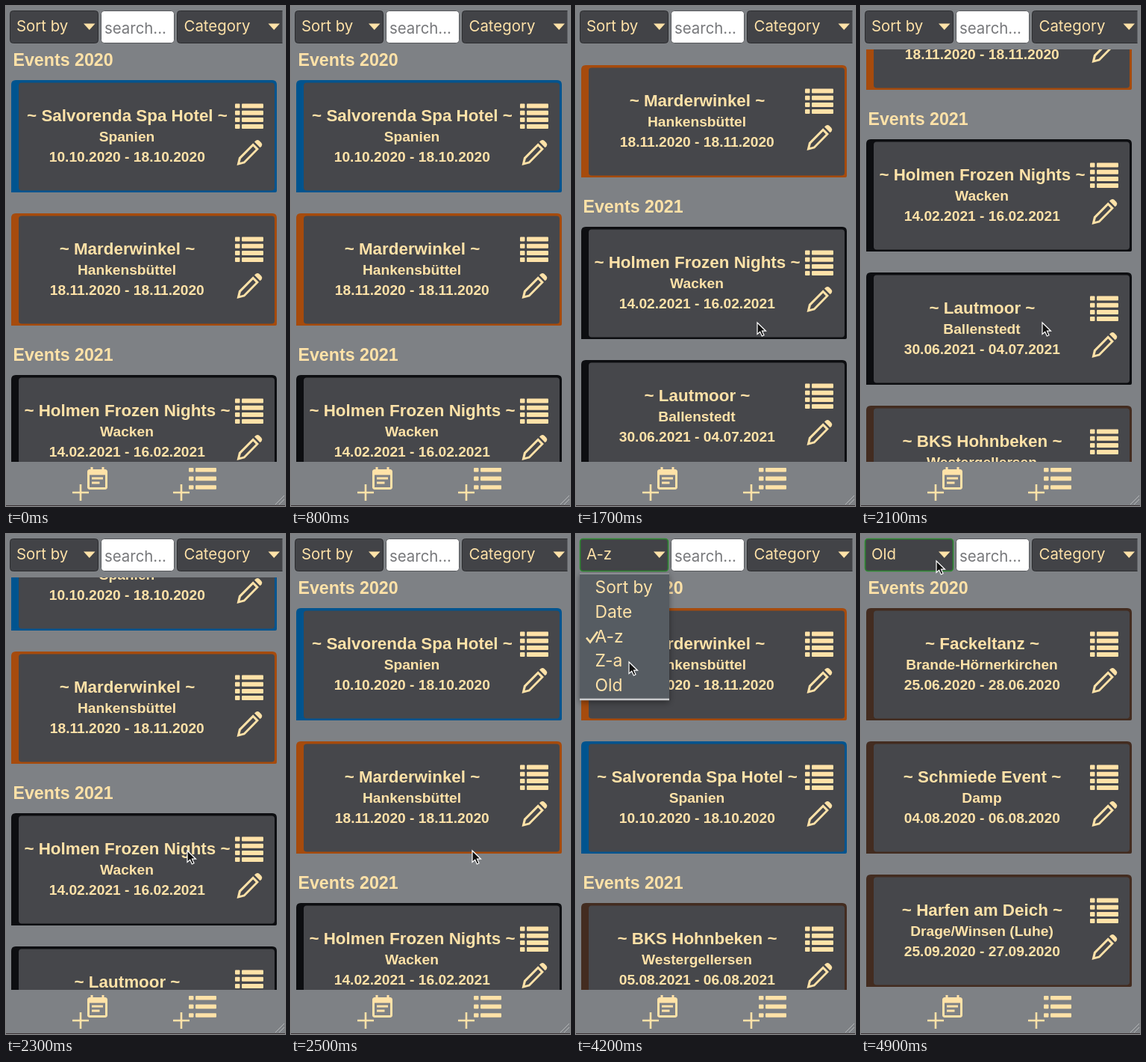
These frames come from a looping animation (374 by 668 pixels, 5 s). An HTML page:

```html
<!DOCTYPE html>
<html lang="de">
<head>
<meta charset="utf-8">
<title>Events</title>
<style>
html, body { margin: 0; width: 100%; height: 100%; overflow: hidden; background: #7e8185; }
svg { display: block; }
text { fill: #ffe2a8; font: bold 19.2px "Liberation Sans", Arial, sans-serif; }
.year { font-size: 23.2px; }
.name { font-size: 22.4px; }
.mid { text-anchor: middle; }
.ui { font: 20.4px Inter, sans-serif; }
.item { font: 22.8px Inter, sans-serif; }
.icon { fill: #ffe2a8; }
.line { fill: none; stroke: #ffe2a8; stroke-width: 2.6; }
.box { fill: #424347; stroke: #2c2d30; }
.box.focus { stroke: #2c8a30; stroke-width: 1.6; }
</style>
</head>
<body>
<svg width="374" height="668" viewBox="0 0 374 668">
  <defs>
    <g id="list" class="icon"></g>
    <g id="pencil">
      <path class="icon" fill-rule="evenodd" d="M.5 34 3 23.5 22.2 4.3 30 12.100 11 31.300ZM4.600 29.900 9.500 28.700 25.800 12.200 22.200 8.600 5.900 25Z"/>
      <path class="icon" d="M24 2.600 26 .8q2.300-1.700 4.600 .3l2.700 2.700q2 2.200 .3 4.500l-1.900 2Z"/>
    </g>
    <filter id="shade" x="-20%" y="-20%" width="140%" height="140%">
      <feDropShadow dx="0" dy="3" stdDeviation="4" flood-opacity=".4"/>
    </filter>
  </defs>
  <rect width="374" height="668" fill="#7e8185"/>
  <g id="events"></g>

  <rect width="374" height="58" fill="#7e8185"/>
  <rect id="sort" class="box" x="5.500" y="6.500" width="118" height="43" rx="4"/>
  <text id="choice" class="ui" x="14" y="34"></text>
  <path class="icon" d="M104 23.500h15.500l-7.750 8.500Z"/>
  <rect x="127.500" y="6.500" width="98" height="43" rx="4" fill="#fff" stroke="#55575b"/>
  <text class="ui" x="132" y="37" style="fill:#77787b">search...</text>
  <path class="box" d="M370.500 6.500H233.500q-4 0-4 4V45.500q0 4 4 4H370.500"/>
  <text class="ui" x="238.500" y="34">Category</text>
  <path class="icon" d="M351.500 23.500h15.500l-7.750 8.500Z"/>

  <rect y="609" width="374" height="59" fill="#7e8185"/>
  <path class="icon" transform="translate(104.5 614.5) scale(1.5)" d="M17 10H7v2h10zM19 3h-1V1h-2v2H8V1H6v2H5c-1.100 0-2 .9-2 2v14c0 1.100 .9 2 2 2h14c1.100 0 2-.9 2-2V5c0-1.100-.9-2-2-2zM19 19H5V8h14zM14 14H7v2h7z" fill-rule="evenodd"/>
  <path class="line" d="M89 650h22m-11-11v22M224 650h22m-11-11v22"/>
  <g id="rows" class="icon"></g>
  <path d="M361 666l12-12m-7 12l7-7" stroke="#b5b7b9" fill="none"/>
  <rect y="667" width="374" height="1" fill="#3b3335"/>

  <g id="menu"></g>
  <path id="cursor" d="M0 0V15.500L3.700 12.200 6.300 18 9 16.800 6.500 11.200H11.500Z" fill="#111" stroke="#fff" stroke-width="1.200"/>
</svg>
<script>
const $ = id => document.getElementById(id);
const blue = '#00548f', orange = '#a64b0d', black = '#0d0e11', brown = '#432c20';

const hotel = ['Salvorenda Spa Hotel', 'Spanien', '10.10.2020 - 18.10.2020', blue];
const park = ['Marderwinkel', 'Hankensbüttel', '18.11.2020 - 18.11.2020', orange];
const nights = ['Holmen Frozen Nights', 'Wacken', '14.02.2021 - 16.02.2021', black];
const rock = ['Lautmoor', 'Ballenstedt', '30.06.2021 - 04.07.2021', black];
const fair = ['BKS Hohnbeken', 'Westergellersen', '05.08.2021 - 06.08.2021', brown];
const dance = ['Fackeltanz', 'Brande-Hörnerkirchen', '25.06.2020 - 28.06.2020', brown];
const smiths = ['Schmiede Event', 'Damp', '04.08.2020 - 06.08.2020', brown];
const harps = ['Harfen am Deich', 'Drage/Winsen (Luhe)', '25.09.2020 - 27.09.2020', brown];

const lists = {
  'Sort by': { 2020: [hotel, park], 2021: [nights, rock, fair] },
  'A-z': { 2020: [park, hotel], 2021: [fair, nights, rock] },
  'Old': { 2020: [dance, smiths, harps] }
};
const options = ['Sort by', 'Date', 'A-z', 'Z-a', 'Old'];

// [time, value...]
const scrollKeys = [[1200, 0], [1300, 25], [1700, 198], [2000, 306], [2100, 315],
  [2200, 255], [2300, 120], [2400, 30], [2500, 0]];
const cursorKeys = [[900, 374, 470], [1200, 243, 423], [2500, 243, 423], [3000, 108, 32],
  [3200, 106, 34], [3500, 66, 137], [3700, 68, 139], [4000, 102, 34], [4100, 94, 70],
  [4200, 71, 171], [4400, 60, 200], [4600, 62, 202], [4800, 96, 60], [4900, 101, 36]];

function at(keys, t) {
  if (t <= keys[0][0]) return keys[0].slice(1);
  const i = keys.findIndex(k => k[0] >= t);
  if (i < 0) return keys[keys.length - 1].slice(1);
  const a = keys[i - 1], b = keys[i], p = (t - a[0]) / (b[0] - a[0]);
  return a.slice(1).map((v, j) => v + (b[j + 1] - v) * p);
}

const bullets = (n, x, y, pitch, h, bar) => Array.from({ length: n }, (_, i) =>
  `<rect x="${x}" y="${y + i * pitch}" width="6.500" height="${h}" rx="1"/>
   <rect x="${x + 9}" y="${y + i * pitch}" width="${bar}" height="${h}" rx="1"/>`).join('');

const card = ([name, place, date, color], y) => `<g transform="translate(0 ${y})">
  <path d="M7 150V6q0-6 6-6H357q6 0 6 6V148q0 2-2 2Z" fill="${color}"/>
  <rect x="17" y="3.500" width="343" height="144" rx="4" fill="#46474b"/>
  <text class="name mid" x="162.500" y="55">~ ${name} ~</text>
  <text class="mid" x="162" y="82">${place}</text>
  <text class="mid" x="162.300" y="109">${date}</text>
  <use href="#list" x="307" y="31.500"/><use href="#pencil" x="309" y="80"/></g>`;

function listMarkup(years) {
  let y = 99, out = '';
  for (const year in years) {
    out += `<text class="year" x="9.500" y="${y - 19}">Events ${year}</text>`;
    for (const event of years[year]) {
      out += card(event, y);
      y += 178;
    }
    y += 38;
  }
  return out;
}

const menuMarkup = choice => `<rect x="5" y="52" width="120" height="170" fill="#575b62" filter="url(#shade)"/>
  <path d="M5 53h120" stroke="#8b8e93" stroke-width="2"/>
  <path d="M5 221h120" stroke="#c9cacc" stroke-width="2.500"/>` +
  options.map((o, i) => `<text class="item" x="25.500" y="${79 + i * 32.8}">${o}</text>`).join('') +
  `<path class="line" d="M14 ${71 + options.indexOf(choice) * 32.8}l5 6 10-14" transform="translate(0 2)"/>`;

$('list').innerHTML = bullets(4, 0, 0, 9.2, 6, 29);
$('rows').innerHTML = bullets(3, 245, 617, 11.6, 5.6, 28);

let shown;
function draw(now) {
  const t = Math.floor(now % 5000 / 100) * 100;
  const choice = t < 3600 ? 'Sort by' : t < 4600 ? 'A-z' : 'Old';
  const open = t >= 3200 && t < 3600 || t >= 4000 && t < 4600;
  if (choice !== shown) {
    shown = choice;
    $('events').innerHTML = listMarkup(lists[choice]);
    $('menu').innerHTML = menuMarkup(choice);
    $('choice').textContent = choice;
  }
  $('events').setAttribute('transform', `translate(0 ${-at(scrollKeys, t)[0]})`);
  $('sort').classList.toggle('focus', t >= 3200);
  $('menu').style.display = open ? '' : 'none';
  $('cursor').style.display = t >= 900 ? '' : 'none';
  $('cursor').setAttribute('transform', `translate(${at(cursorKeys, t)})`);
}

const start = performance.now();
function tick() {
  draw(performance.now() - start);
  requestAnimationFrame(tick);
}
tick();
</script>
</body>
</html>
```
